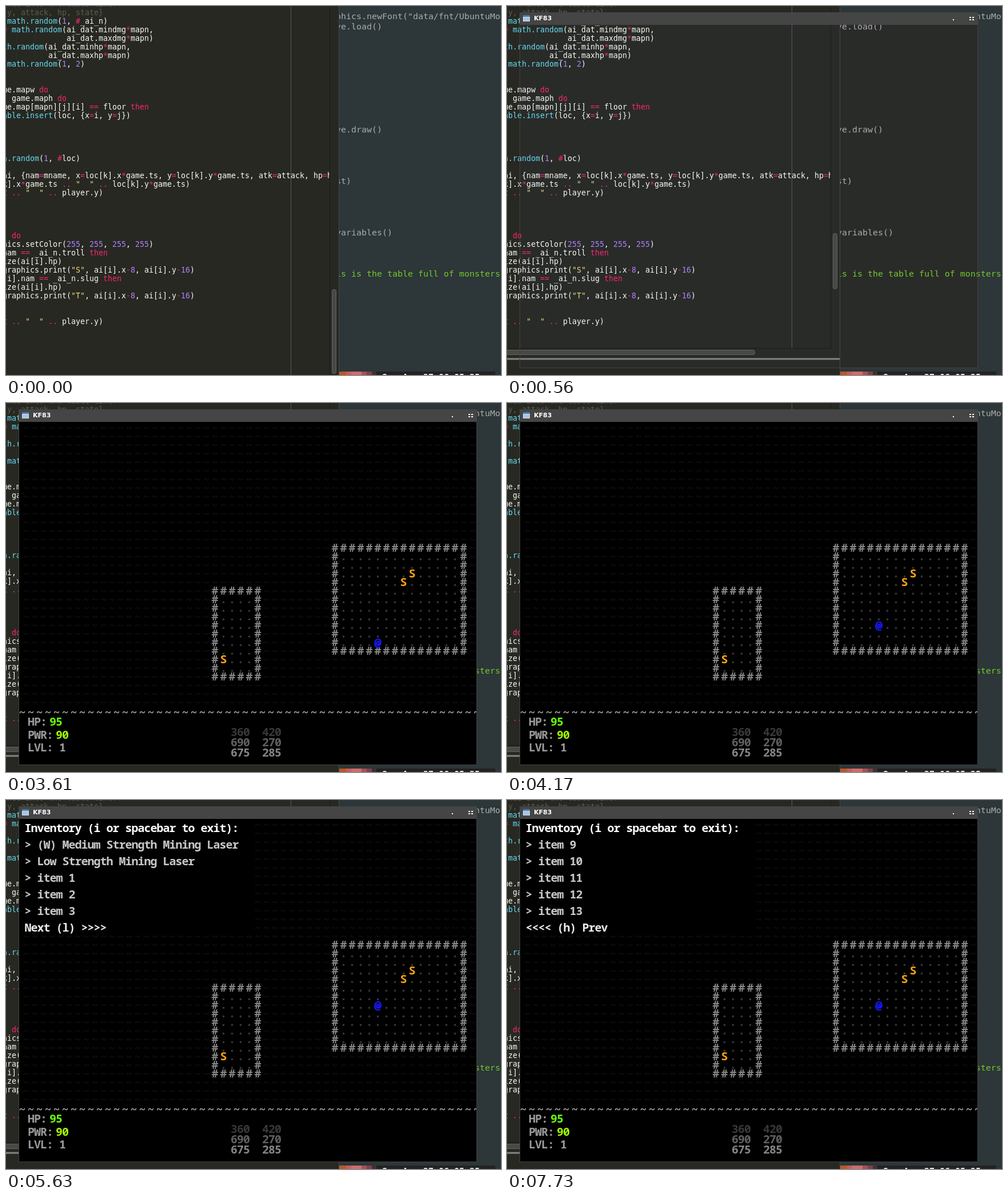
Write an HTML page that moves like this. It is 866 by 645 pixels and loops after 8 s.

```html
<!DOCTYPE html>
<html lang="en">
<head>
<meta charset="utf-8">
<title>Roguelike</title>
<style>
html, body { margin: 0; width: 100%; height: 100%; overflow: hidden; background: #272822; }
svg { display: block; width: 866px; height: 645px; }
text { white-space: pre; }
.code { font: 13.29px "DejaVu Sans Mono", monospace; }
.term { font: 14.95px "DejaVu Sans Mono", monospace; }
.clock { font: bold 14.95px "DejaVu Sans Mono", monospace; }
.title { font: bold 11px "DejaVu Sans", sans-serif; }
.game { font: bold 20px "Noto Sans Mono", "DejaVu Sans Mono", monospace; letter-spacing: -1px; }
.tile { font: bold 20px "Noto Sans Mono", "DejaVu Sans Mono", monospace; letter-spacing: 3px; }
#player { stroke: #1818ff; stroke-width: .6px; }
</style>
</head>
<body>
<svg id="stage" viewBox="0 0 866 645" xmlns="http://www.w3.org/2000/svg"></svg>
<script>
const esc = s => s.replace(/&/g, '&amp;').replace(/</g, '&lt;');
const rect = (x, y, w, h, fill, more = '') =>
  `<rect x="${x}" y="${y}" width="${w}" height="${h}" fill="${fill}" ${more}/>`;
const text = (cls, s, x, y, fill) =>
  `<text xml:space="preserve" class="${cls}" x="${x}" y="${y}" fill="${fill}">${esc(s)}</text>`;
const group = (id, body, more = '') => `<g id="${id}" ${more}>${body}</g>`;

// ---- editor ----
const TOKENS = [
  ['#e6db74', /^"[^"]*"/],
  ['#66d9ef', /^(math\.random|th\.random|h\.random|able\.insert)/],
  ['#f92672', /^(do|then)\b/],
  ['#ae81ff', /^\d+/],
  ['#f92672', /^(==|\.\.|[=*#-])/],
  ['#f8f8f2', /^(\w+|\s+|.)/]
];

function highlight(s) {
  let out = '';
  while (s) {
    const [fill, re] = TOKENS.find(t => t[1].test(s));
    const word = s.match(re)[0];
    out += `<tspan fill="${fill}">${esc(word)}</tspan>`;
    s = s.slice(word.length);
  }
  return out;
}

// line number, column, code
const CODE = [
  [2, 0, 'math.random(1, #_ai_n)'],
  [3, -1, '= math.random(ai_dat.mindmg*mapn,'],
  [4, 13, 'ai_dat.maxdmg*mapn)'],
  [5, -1, 'th.random(ai_dat.minhp*mapn,'],
  [6, 9, 'ai_dat.maxhp*mapn)'],
  [7, 0, 'math.random(1, 2)'],
  [10, -1, 'me.mapw do'],
  [11, 1, 'game.maph do'],
  [12, -1, 'me.map[mapn][j][i] == floor then'],
  [13, -1, 'able.insert(loc, {x=i, y=j})'],
  [18, -1, 'h.random(1, #loc)'],
  [20, -1, 'ai, {nam=mname, x=loc[k].x*game.ts, y=loc[k].y*game.ts, atk=attack, hp=hp'],
  [21, -1, 'k].x*game.ts .. "  " .. loc[k].y*game.ts)'],
  [22, -1, 't .. "  " .. player.y)'],
  [27, 1, 'do'],
  [28, -1, 'hics.setColor(255, 255, 255, 255)'],
  [29, -1, 'nam == _ai_n.troll then'],
  [30, -1, 'ize(ai[i].hp)'],
  [31, -1, 'graphics.print("S", ai[i].x-8, ai[i].y-16)'],
  [32, -1, '[i].nam == _ai_n.slug then'],
  [33, -1, 'ize(ai[i].hp)'],
  [34, -1, 'graphics.print("T", ai[i].x-8, ai[i].y-16)'],
  [37, -1, 't .. "  " .. player.y)']
];

const codeText =
  text('code', 'ned into the table line.', 2, 1, '#5e5b4c') +
  text('code', 'y, attack, hp, state}', 2, 16, '#5e5b4c') +
  CODE.map(([n, col, s]) =>
    `<text xml:space="preserve" class="code" x="${2 + col * 8}" y="${1 + n * 15}">${highlight(s)}</text>`).join('') +
  '<path d="M18.5 50v14M50.5 50v14M18.5 80v14M50.5 80v14" stroke="#3c3d37" stroke-dasharray="1 2"/>';

const thumb = (x, y, w, h) =>
  rect(x + .5, y + .5, w - 1, h - 1, '#484947', 'rx="3" stroke="#62635f"');

const tallEditor =
  rect(498, 0, 1, 645, '#5a5b56') + rect(566, 0, 1, 645, '#1b1c18') + thumb(570, 495, 8, 148);
const shortEditor =
  rect(498, 0, 1, 598, '#5a5b56') + rect(566, 0, 1, 598, '#1b1c18') +
  rect(0, 598, 567, 1, '#1b1c18') + thumb(570, 397, 8, 98) +
  thumb(-8, 601, 442, 9) + rect(0, 615, 582, 1, '#5c5d5a') +
  rect(0, 616, 582, 2, '#858683') + rect(0, 618, 582, 1, '#4a4b48');

// ---- terminal ----
const TERM = [
  [0, 'phics.newFont("data/fnt/UbuntuMo'], [1, 've.load()'], [11, 've.draw()'],
  [16, 'st)'], [21, 'variables()'], [25, 'is is the table full of monsters', '#73c92d']
];
const termText = TERM.map(([n, s, fill = '#a9adab']) =>
  text('term', s, 577, 23 + n * 18, fill)).join('');

const BLOCKS = [
  [583, 12, '#b8582a'], [595, 9, '#c4605a'], [604, 18, '#d06c6c'],
  [622, 9, '#a3525a'], [631, 9, '#7c4348'], [640, 8, '#403034']
];
const statusBar =
  rect(648, 639, 208, 6, '#222322') +
  BLOCKS.map(([x, w, fill]) => rect(x, 639, w, 6, fill)).join('') +
  text('clock', 'Sun Apr 27 06:05:25', 658, 653, '#f4f4f4');

// ---- game window ----
const frame =
  rect(22.5, 11.5, 801, 621, 'none', 'stroke="#424342"') +
  rect(22, 11, 802, 22, '#444544') +
  rect(28, 16, 12, 11, '#d4dfea') + rect(28, 16, 12, 3, '#4a7ab8') + rect(29, 20, 10, 6, '#a9c4e0') +
  text('title', 'KF83', 47, 25, '#fff') +
  rect(780, 23, 2, 2, '#fff') +
  [809, 814].map(x => rect(x, 19, 3, 2, '#fff') + rect(x, 23, 3, 2, '#fff')).join('');

// tiles are placed by the centre of their 15 px cell
const tiles = (s, x, y, fill) => text('tile', s, x - 6, y + 7, fill);

function room(x, y, cols, rows) {
  let out = rect(x - 7.5, y - 7, cols * 15, rows * 15, '#000');
  for (let r = 0; r < rows; r++) {
    const cy = y + r * 15;
    if (r === 0 || r === rows - 1) {
      out += tiles('#'.repeat(cols), x, cy, '#888');
    } else {
      out += tiles('#', x, cy, '#888') + tiles('#', x + (cols - 1) * 15, cy, '#888') +
        tiles('.'.repeat(cols - 2), x + 15, cy, '#383838');
    }
  }
  return out;
}

let rock = '';
for (let y = 44; y < 530; y += 15) rock += tiles('~'.repeat(53), 35.5, y, '#0f0f0f');

const hud =
  tiles('~'.repeat(54), 28.5, 541, '#acacac') +
  text('game', 'HP:', 38, 564, '#999') + text('game', '95', 76, 564, '#66ff0c') +
  text('game', 'PWR:', 38, 587, '#999') + text('game', '90', 87, 587, '#a4f500') +
  text('game', 'LVL: 1', 38, 609, '#999') +
  text('game', '360  420', 393, 582, '#383838') +
  text('game', '690  270', 393, 600, '#606060') +
  text('game', '675  285', 393, 618, '#848484');

const slugs = [[710.5, 298], [695.5, 313], [380.5, 448]]
  .map(([x, y]) => tiles('S', x, y, '#ffa510')).join('');

const items = (from, n) => Array.from({ length: n }, (_, i) => 'item ' + (from + i));
const PAGES = [
  [['(W) Medium Strength Mining Laser', 'Low Strength Mining Laser', ...items(1, 3)], 'Next (l) >>>>'],
  [items(4, 5), '<<<< (h) Prev   Next (l) >>>>'],
  [items(9, 5), '<<<< (h) Prev']
];
const page = ([list, foot], i) => group('page' + i,
  rect(23, 33, 410, 202, '#000') +
  text('game', 'Inventory (i or spacebar to exit):', 32.5, 56, '#fff') +
  list.map((s, k) => text('game', '> ' + s, 32.5, 85 + k * 29, '#c8c8c8')).join('') +
  text('game', foot, 32.5, 230, '#ececec'));

const game =
  rect(23, 33, 800, 599, '#000') + rock +
  room(365.5, 328, 6, 11) + room(575.5, 253, 16, 13) + slugs +
  group('player', tiles('@', 0, 0, '#1818ff')) + hud + PAGES.map(page).join('');

const stage = document.getElementById('stage');
stage.innerHTML =
  '<clipPath id="left"><path d="M0 0H566V645H0z"/></clipPath>' +
  '<clipPath id="right"><path d="M583 0H866V645H583z"/></clipPath>' +
  '<clipPath id="pane"><path d="M23 33H823V632H23z"/></clipPath>' +
  rect(0, 0, 866, 645, '#272822') + rect(583, 0, 283, 645, '#2d3638') +
  group('plate', rect(23, 33, 800, 599, '#292b29')) +
  rect(582, 0, 1, 645, '#454845') +
  group('tall', tallEditor) + group('short', shortEditor) +
  group('code', codeText, 'clip-path="url(#left)"') +
  group('term', termText + statusBar, 'clip-path="url(#right)"') +
  group('game', game, 'clip-path="url(#pane)"') +
  group('frame', frame);

// ---- timeline ----
const LOOP = 8000;
const FADE = [[0, 0], [390, .35], [475, .7], [560, 1]];
const WALK = [
  [0, [665.5, 419]], [3610, [650.5, 419]], [4000, [650.5, 404]],
  [4170, [650.5, 389]], [4350, [650.5, 374]], [4530, [650.5, 359]]
];
const OPEN = [[0, -1], [5630, 0], [6980, 1], [7730, 2]];

const at = (steps, t) => steps.filter(s => s[0] <= t).pop()[1];
const el = id => document.getElementById(id);
const show = (id, on) => el(id).setAttribute('display', on ? 'inline' : 'none');

function draw(t) {
  const fade = at(FADE, t), open = at(OPEN, t);
  el('plate').setAttribute('opacity', fade);
  el('frame').setAttribute('opacity', fade);
  show('tall', t < 390);
  show('short', t >= 390);
  show('game', t >= 590);
  el('player').setAttribute('transform', `translate(${at(WALK, t)})`);
  PAGES.forEach((_, i) => show('page' + i, i === open));
}

const start = performance.now();
function tick() {
  draw((performance.now() - start) % LOOP);
  requestAnimationFrame(tick);
}
draw(0);
requestAnimationFrame(tick);
</script>
</body>
</html>
```
